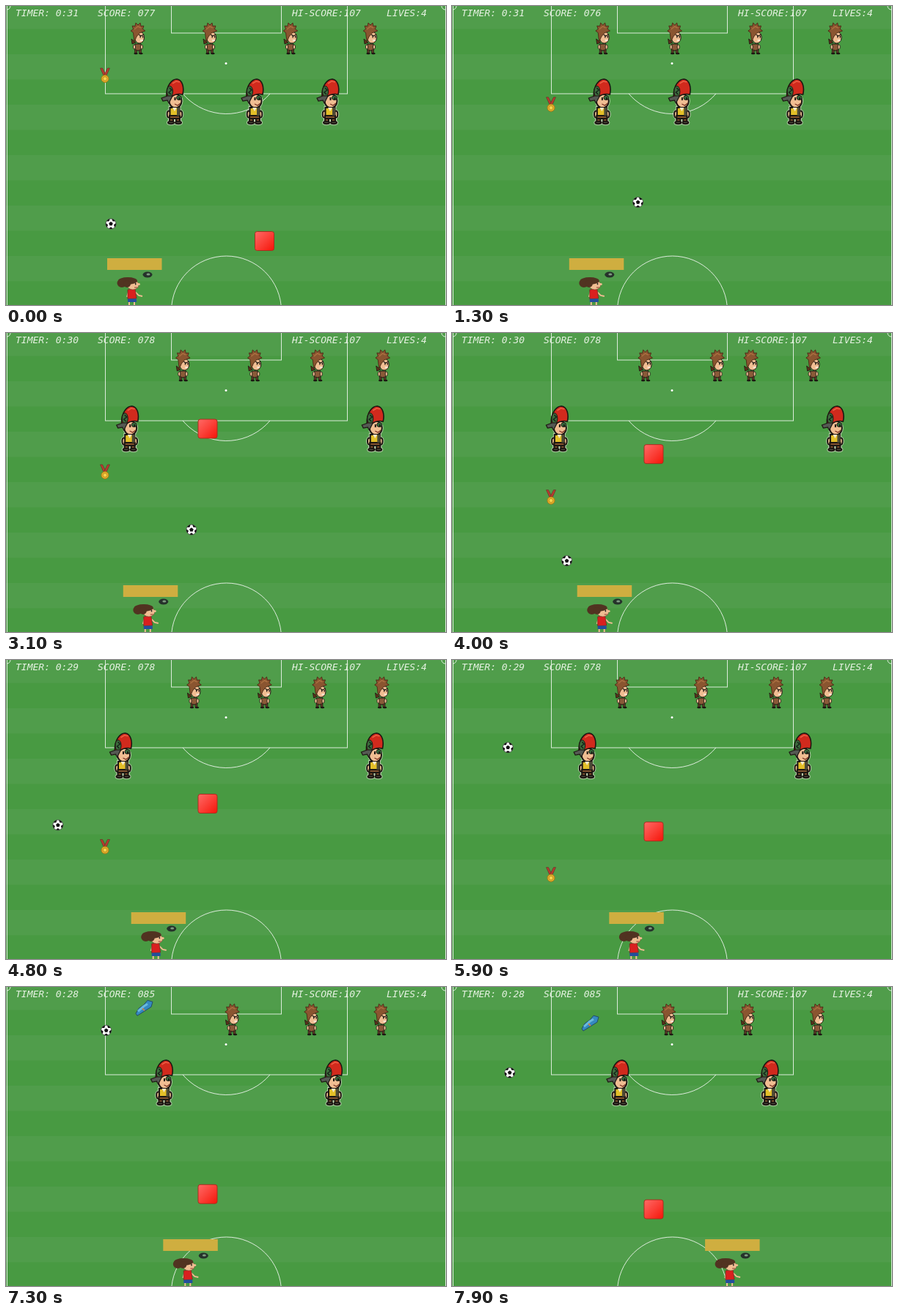
These frames come from a looping animation (600 by 409 pixels, 8000 ms). An HTML page with a canvas:

```html
<!DOCTYPE html>
<html>
<head>
<meta charset="utf-8">
<style>
html, body { margin: 0; width: 100%; height: 100%; overflow: hidden; background: #489a42; }
canvas { display: block; }
</style>
</head>
<body>
<canvas id="stage" width="600" height="409"></canvas>
<script>
const g = document.getElementById('stage').getContext('2d');
const LOOP = 8000, STEP = 100;
const BALL_SPEED = 2.78, WALK_SPEED = .645, PADDLE_STEP = 10.9;
const CARD_HIT = 15, FIRST_HIT = 67.3, SECOND_HIT = 233.8, MEDAL_CAUGHT = 237;
const INK = '#1c1712', SKIN = '#f0bd92';
const clamp = v => Math.min(1, Math.max(0, v));

// Pixels an item has fallen by time t; the game runs a little unevenly.
function fallen(t) {
  if (t < 3100) return t * .0306;
  if (t < 4800) return 95 + (t - 3100) * .0385;
  return 160.5 + (t - 4800) * .0347;
}
// Position after walking a distance from corner to corner.
function walk(corners, dist) {
  let i = 0, len;
  while (dist > (len = Math.abs(corners[i + 1] - corners[i]))) { dist -= len; i++; }
  return corners[i] + dist * Math.sign(corners[i + 1] - corners[i]);
}

function paint(fill, line, width = 1) {
  if (fill) { g.fillStyle = fill; g.fill(); }
  if (line) { g.strokeStyle = line; g.lineWidth = width; g.stroke(); }
}
function poly(pts, fill, line, width) {
  g.beginPath();
  for (let i = 0; i < pts.length; i += 2) g.lineTo(pts[i], pts[i + 1]);
  if (fill) g.closePath();
  paint(fill, line, width);
}
function oval(x, y, rx, ry, fill, line, width) {
  g.beginPath();
  g.ellipse(x, y, rx, ry, 0, 0, 7);
  paint(fill, line, width);
}
function box(x, y, w, h, fill, line, width) {
  g.beginPath();
  g.rect(x, y, w, h);
  paint(fill, line, width);
}
function arc(x, y, r, from, to) {
  g.beginPath();
  g.arc(x, y, r, from * Math.PI, to * Math.PI);
  g.stroke();
}
function place(x, y, draw) {
  g.save();
  g.translate(x, y);
  draw();
  g.restore();
}

function field() {
  box(0, 0, 600, 409, '#489a42');
  for (let y = -3; y < 409; y += 69) box(0, y, 600, 34.5, '#509d4b');
  g.strokeStyle = 'rgba(255,255,255,.8)';
  g.lineWidth = 1;
  g.strokeRect(1.5, -1, 598, 420);
  g.strokeRect(135.5, -1, 330, 121);
  g.strokeRect(225.5, -1, 150, 38);
  arc(300.5, 69.5, 78, .224, .776);
  arc(300.5, 417, 75, 1, 2);
  arc(1, 0, 5, 0, .5);
  arc(599, 0, 5, .5, 1);
  oval(300, 78.5, 1.5, 1.5, '#fff');
}

function spiky() {
  poly([-3, 28, -9, 23, -8, 30], '#5d301a', INK, .8);
  box(-4, 30, 8, 9, '#8a5a38', INK);
  for (const side of [-1, 1]) {
    oval(side * 5, 34, 1.6, 3, SKIN, INK, .8);
    box(side * 3 - 1.5, 38, 3, 5, '#5b3a26', INK, .6);
    oval(side * 3.5 + .5, 43, 2.7, 1.3, INK);
  }
  oval(2, 21, 6.5, 8, SKIN, INK);
  const hair = [-5, 27];
  for (let i = 0; i < 12; i++) {
    const a = Math.PI * (.9 + i * .1), r = i % 2 ? 11.5 : 8;
    hair.push(r * .85 * Math.cos(a), 12 + r * Math.sin(a));
  }
  poly([...hair, 2, 15, -2, 20], '#8a5530', '#4a2815', .9);
  poly([-5, 10, 0, 6, 4, 8], null, '#ab6f40', 1.5);
  poly([1, 17, 4, 19, 8, 17], null, INK, 1.2);
  box(2.5, 19, 1.3, 2.5, INK);
  box(6, 19, 1.3, 2.5, INK);
  poly([3, 25, 7, 25], null, '#fff', 1.2);
}

function capBoy() {
  // Pale halo first, dark outline over it.
  for (const [line, width] of [['rgba(235,240,220,.6)', 4], [INK, 2]]) {
    oval(1, 30, 8.5, 9.5, SKIN, line, width);
    for (const side of [-1, 1]) {
      oval(side * 8, 48, 2.3, 4.5, SKIN, line, width);
      box(side * 4.5 - 2.5, 54, 5, 4, '#80512f', line, width);
      oval(side * 5, 59.5, 4, 1.8, '#4d453d', line, width);
    }
    box(-6.5, 39, 13, 11, '#e3bf28', line, width);
    box(-7, 50, 14, 4, '#80512f', line, width);
  }
  box(3, 39, 4, 11, '#4d4a35');
  poly([-3, 39, 0, 44, 3, 39], '#f7e7ca');
  g.beginPath();
  g.moveTo(-11, 24);
  g.bezierCurveTo(-12, 8, -3, 0, 3, 0);
  g.bezierCurveTo(11, 1, 13, 12, 11, 21);
  g.quadraticCurveTo(2, 19, -4, 24);
  paint('#d12a1d', INK, 1.6);
  oval(-6.5, 17, 4, 7.5, '#3e6c3d', INK);
  poly([-7, 12, -4, 15, -8, 18, -5, 21], null, '#15251a', 1.5);
  poly([-3, 6, 2, 3, 7, 4], null, '#ec6046', 1.5);
  poly([-3, 23, -10, 23, -18, 26, -16, 30, -10, 29, -8, 33], '#555953', INK, 1.2);
  oval(6, 25.5, 3.5, 3, '#367040', INK);
  box(-.5, 25, 2, 4, INK);
  box(5.5, 25, 2, 3, INK);
  poly([0, 34, 4, 36, 8, 33], null, '#792f20', 1.2);
}

function pentagon(x, y, r, turn) {
  const pts = [];
  for (let a = turn; pts.length < 10; a += Math.PI * .4)
    pts.push(x + r * Math.cos(a), y + r * Math.sin(a));
  poly(pts, '#111');
}
function ball() {
  oval(0, 0, 7, 7, '#fff', '#444', .8);
  g.clip();
  pentagon(0, 0, 2.9, -Math.PI / 2);
  for (let i = 0; i < 5; i++) {
    const a = (i * .4 - .3) * Math.PI;
    pentagon(7 * Math.cos(a), 7 * Math.sin(a), 2.8, a + Math.PI);
  }
}

function card() {
  const fade = g.createLinearGradient(-13, -13, 13, 13);
  fade.addColorStop(0, '#ff6a66');
  fade.addColorStop(.5, '#fb4038');
  fade.addColorStop(1, '#f61408');
  g.beginPath();
  g.roundRect(-13, -13, 26, 26, 3);
  paint(fade, '#a5301f');
}

function medal() {
  for (const side of [-1, 1])
    poly([side * 6.5, -10, side * 3.5, -10, -side, -1, side * 2, 0], '#b93a30', '#5c3026', .6);
  oval(0, 4.5, 5, 5, '#e9b52b', '#a87616');
  oval(0, 4.5, 2.8, 2.8, '#f6d24b', '#b27d18', .8);
}

function shoe() {
  poly([-11, 8, -7, 1, 0, -4, 5, -10, 12, -8, 10, -1, 2, 4, -9, 11], '#3589c0', '#234b67');
  poly([-8, 5, 0, -2, 5, -5], null, '#69b9dc', 3);
  poly([-2, 1, 1, 4], null, '#e48335', 1.6);
}

function player() {
  box(0, 345, 74.5, 16, '#cfae40');
  oval(55, 367.5, 6.5, 4, '#26322b');
  oval(56, 367, 2.5, 1.5, '#7d9a80');
  poly([38, 391, 43, 396, 48, 397], null, SKIN, 1.8);
  poly([29, 391, 27, 398], null, SKIN, 1.8);
  for (const x of [30, 37]) poly([x, 402, x, 409], null, SKIN, 2);
  poly([28, 388, 38, 387, 40, 400, 28, 401], '#d9201f', '#6f2420', .7);
  box(28, 400.5, 12, 4.5, '#244f9c');
  oval(35, 381.5, 8, 6.5, SKIN, '#75462f', .6);
  oval(43, 380.5, 2, 1.5, SKIN);
  oval(28, 376, 13, 5, '#513321');
  oval(20, 379, 6.5, 6, '#513321');
  oval(27, 380, 5, 5, '#513321');
  box(38, 379, 1.4, 2.4, '#222');
  poly([37, 385, 41, 385], null, '#8f3d31');
}

// Each walker lists the places where it turns round, then runs on.
const spikies = [
  { turns: [180, 270, 0], until: SECOND_HIT },
  { turns: [278, 367, 334, 340, 0] },
  { turns: [388, 437, 405, 447, 414, 417, 0] },
  { turns: [497, 536, 492, 524, 497, 513, 0] }];
const capBoys = [
  { turns: [230, 143, 600] },
  { turns: [339, 0], until: FIRST_HIT },
  { turns: [442, 524, 0] }];
// The ball always flies at 45 degrees, so both lists share their lengths.
const ballX = [143, 183.5, 330, 183.5, 20.5, 174, -200];
const ballY = [298, 338.5, 192, 338.5, 175.5, 22, 396];
const drops = [
  { draw: card, x: 352.5, y: 321.5, from: 0, until: CARD_HIT },
  { draw: card, x: 275, y: 36, from: FIRST_HIT },
  { draw: medal, x: 135, y: 95, from: 0, until: MEDAL_CAUGHT },
  { draw: shoe, x: 188, y: -219, from: SECOND_HIT }];
const points = [[CARD_HIT, -1], [FIRST_HIT, 2], [SECOND_HIT, 2], [MEDAL_CAUGHT, 5]];
// Key presses: start, duration, paddle steps.
const presses = [[200, 200, 2], [3900, 100, 1], [4900, 200, 4],
  [6400, 450, -12], [6950, 300, 12], [7300, 600, 12]];

const alive = (item, fall) => fall < (item.until ?? Infinity);

function hud(fall) {
  const score = points.reduce((sum, [when, gain]) => sum + (fall >= when ? gain : 0), 77);
  g.font = 'italic 13px "DejaVu Sans Mono", monospace';
  g.fillStyle = '#e6f2e2';
  g.fillText('TIMER: 0:' + (31 - Math.floor((fall + 10) / 75)), 13, 14);
  g.fillText('SCORE: 0' + score, 125, 14);
  g.fillText('HI-SCORE:107', 390, 14);
  g.fillText('LIVES:4', 519, 14);
}

function render(t) {
  const fall = fallen(t), flown = fall * BALL_SPEED;
  field();
  hud(fall);
  for (const [row, y, draw] of [[spikies, 22, spiky], [capBoys, 100, capBoy]])
    for (const foe of row)
      if (alive(foe, fall)) place(walk(foe.turns, fall * WALK_SPEED), y, draw);
  for (const d of drops)
    if (fall >= d.from && alive(d, fall)) place(d.x, d.y + fall, d.draw);
  const steps = presses.reduce((sum, [from, time, n]) => sum + n * clamp((t - from) / time), 0);
  place(138 + PADDLE_STEP * steps, 0, player);
  place(walk(ballX, flown), walk(ballY, flown), ball);
}

const start = performance.now();
function tick() {
  const t = (performance.now() - start) % LOOP;
  render(Math.floor(t / STEP) * STEP);
  requestAnimationFrame(tick);
}
tick();
</script>
</body>
</html>
```
